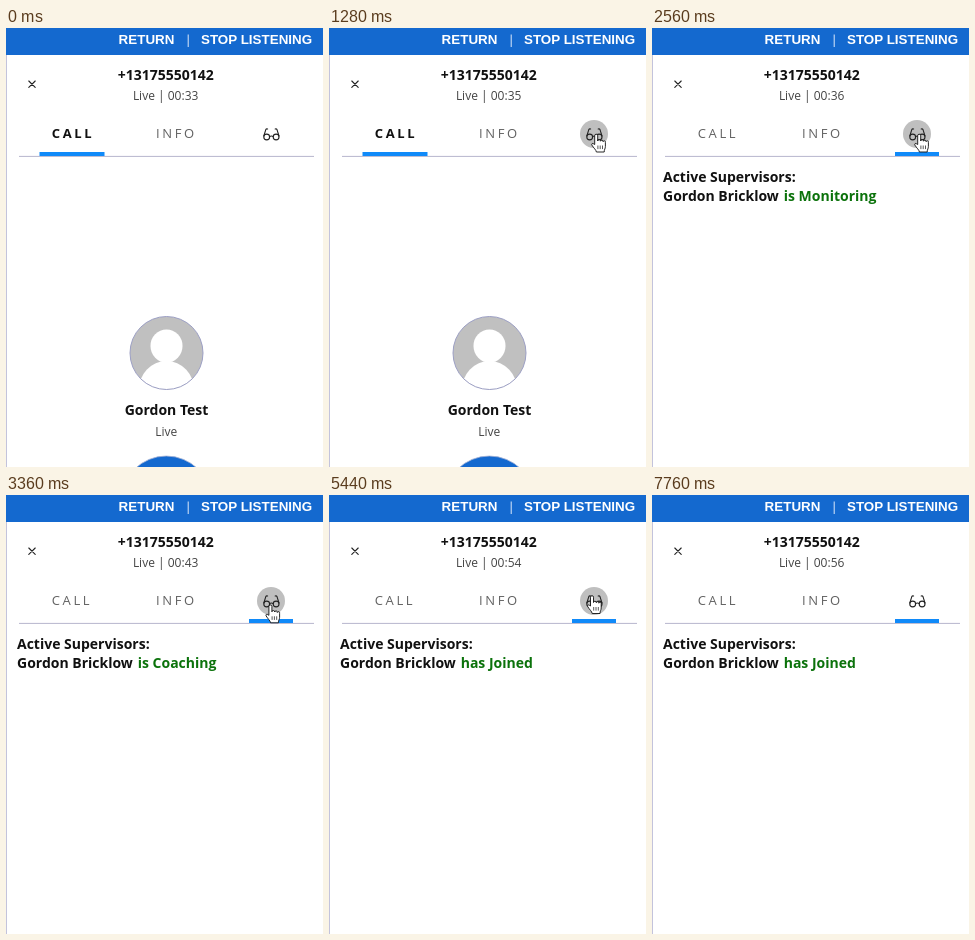
Animation of 317 by 439 pixels, one loop 7840 ms. Source, as an HTML page:

```html
<!DOCTYPE html>
<html lang="en">
<head>
<meta charset="utf-8">
<title>Call monitor</title>
<style>
  html, body { margin: 0; width: 100%; height: 100%; overflow: hidden; background: #fff; }
  svg { display: block; width: 317px; height: 439px; }
  text { font-family: "Open Sans", sans-serif; font-size: 14px; fill: #111; white-space: pre; }
  .bar { font: bold 13.4px "Liberation Sans", Arial, sans-serif; fill: #fff; }
  .b { font-weight: 700; }
  .sub { font-size: 12px; fill: #444; }
  .tab { font-size: 13px; letter-spacing: 2.6px; fill: #626262; }
  .tab.b { fill: #111; }
  .mid { text-anchor: middle; }
  .status { fill: #0b720b; }
  .line { fill: none; stroke: #222; stroke-width: 1.1; stroke-linecap: round; }
  .pointer { fill: #fff; stroke: #111; stroke-width: .9; stroke-linejoin: round; }
</style>
</head>
<body>
<svg viewBox="0 0 317 439">
  <defs><clipPath id="round"><circle cx="160.5" cy="325" r="36.5"/></clipPath></defs>
  <rect width="317" height="439" fill="#fff"/>
  <path d="M.5 27V439" stroke="#c3c3dc"/>
  <rect width="317" height="27" fill="#1469cf"/>
  <text class="bar" x="112.6" y="16.4">RETURN</text>
  <path d="M182.2 6.5V19" stroke="#dce9fa"/>
  <text class="bar" x="195" y="16.4">STOP LISTENING</text>

  <path class="line" d="M22.8 53l6.4 6.4M29.2 53l-6.4 6.4"/>
  <text class="b mid" x="159.7" y="52">+13175550142</text>
  <text class="sub" x="126.9" y="71.5">Live | 00:<tspan id="sec">33</tspan></text>

  <text class="tab b" id="call" x="45.8" y="110.3">CALL</text>
  <text class="tab" x="150" y="110.3">INFO</text>
  <path d="M13 128.4H308" stroke="#b7b6cd"/>
  <rect id="ink" y="124" height="4" fill="#108af9"/>
  <circle id="hover" cx="265" cy="106" r="14" fill="#bfbfbf"/>
  <g class="line">
    <circle cx="260.7" cy="109" r="2.9"/>
    <circle cx="270.1" cy="109" r="2.9"/>
    <path d="M263.6 108.6q1.8-1.2 3.6 0M257.8 108l2-6.4q.5-1 1.8-.6M273 108l-2-6.4q-.5-1-1.8-.6"/>
  </g>

  <g id="caller">
    <g clip-path="url(#round)">
      <circle cx="160.5" cy="325" r="37" fill="#c0c0c0"/>
      <ellipse cx="160.5" cy="363" rx="28" ry="30" fill="#fff"/>
      <ellipse cx="160.5" cy="318" rx="16" ry="16.5" fill="#fff"/>
    </g>
    <circle cx="160.5" cy="325" r="36.5" fill="none" stroke="#9c9fc4"/>
    <text class="b mid" x="160.5" y="387">Gordon Test</text>
    <text class="sub mid" x="160.3" y="408">Live</text>
    <circle cx="160.3" cy="473" r="45" fill="#1469cf" stroke="#a9b4d6" stroke-width=".8"/>
  </g>

  <g id="watch" class="b">
    <text x="11" y="154">Active Supervisors:</text>
    <text x="11" y="173">Gordon Bricklow</text>
    <text class="status" id="status" x="131.7" y="173"></text>
  </g>

  <g id="hand" class="pointer">
    <path d="M-1.5 10V1.2a1.5 1.5 0 0 1 3 0V6.5a1.4 1.4 0 0 1 2.8.2a1.3 1.3 0 0 1 2.6.5a1.2 1.2 0 0 1 2.3.8V12c0 2-1.2 3-1.2 5.5H.2C0 15.5-2.6 13.5-4.3 10.6c-.8-1.4.9-2.3 1.8-1.2z"/>
    <path d="M1.7 11v3.6M4 11v3.6M6.3 11v3.6" stroke-width=".7"/>
  </g>
  <path id="arrow" class="pointer" d="M0 0V14l3.2-3 2.2 5 2.2-1-2.2-4.8H10z"/>
</svg>
<script>
const LOOP = 7840, STEP = 80, SECOND = 960;
const el = id => document.getElementById(id);
const [sec, call, ink, hover, caller, watch, status, hand, arrow] =
  ["sec", "call", "ink", "hover", "caller", "watch", "status", "hand", "arrow"].map(el);

// Three recordings cut together, each with its own clock offset and pointer spot
const takes = [
  { from: 0, clock: 33, text: "is Monitoring", spot: [267.2, 106.5] },
  { from: 3360, clock: 39, text: "is Coaching", spot: [264.4, 110.3] },
  { from: 4640, clock: 48, text: "has Joined", spot: [263, 101] },
];
const entry = [312, 165], exit = [286, 256];

const ramp = (t, a, b) => Math.min(1, Math.max(0, (t - a) / (b - a)));
const ease = p => p * p * (3 - 2 * p);
const mix = (a, b, p) => a + (b - a) * p;

function draw(t) {
  const take = takes.findLast(k => k.from <= t);
  sec.textContent = take.clock + Math.floor((t + 800) / SECOND);
  status.textContent = take.text;
  call.classList.toggle("b", t < 1520);

  const slide = ease(ramp(t, 1460, 1740));
  ink.setAttribute("x", mix(33.5, 243, slide));
  ink.setAttribute("width", mix(65, 44, slide));
  caller.style.opacity = 1 - ramp(t, 1480, 1768);
  watch.style.opacity = ramp(t, 1650, 1970);

  const come = ease(ramp(t, 1000, 1280)), leave = ramp(t, 7280, 7560) ** 2;
  const shown = t >= 1040 && t < 7600;
  const over = come > .8 && leave < .2;
  const move = take.spot.map((v, i) => mix(mix(entry[i], v, come), exit[i], leave));
  for (const [cursor, on] of [[hand, over], [arrow, !over]]) {
    cursor.style.display = shown && on ? "" : "none";
    cursor.setAttribute("transform", `translate(${move})`);
  }
  hover.style.opacity = ramp(t, 1120, 1280) * (1 - ramp(t, 7360, 7520));
}

const start = performance.now();
function tick() {
  const t = (performance.now() - start) % LOOP;
  draw(Math.floor(t / STEP) * STEP);
  requestAnimationFrame(tick);
}
tick();
</script>
</body>
</html>
```
